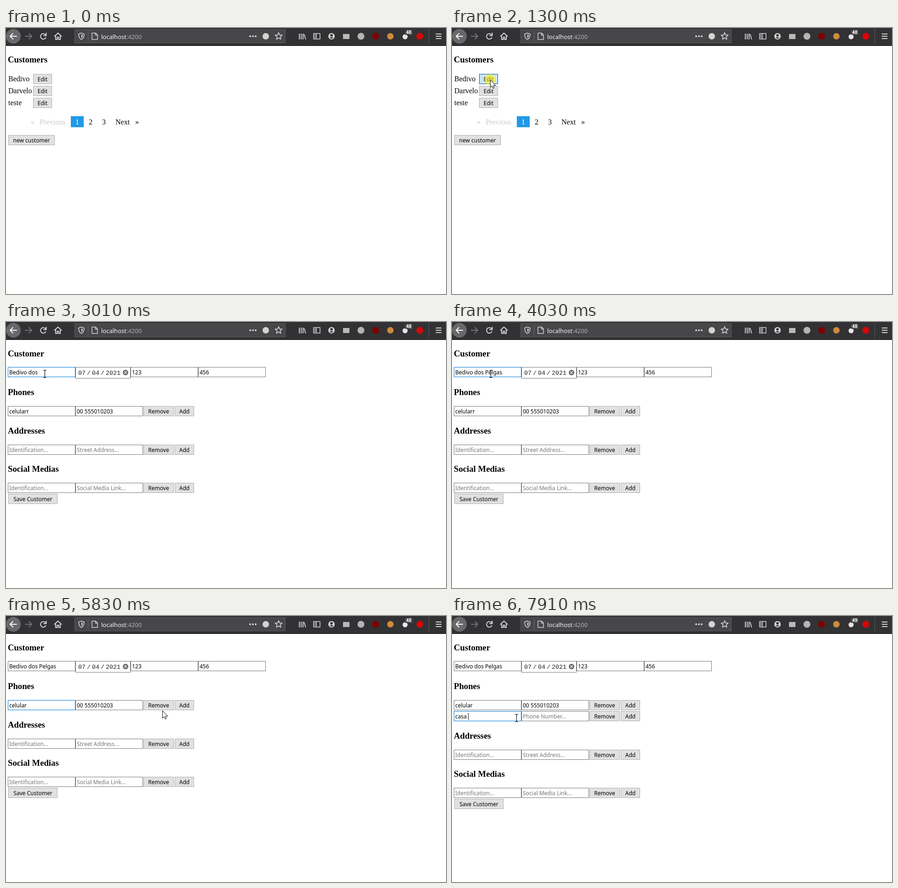
Animation of 957x579 px, one loop 8 s. Source, as an HTML page with a canvas:

```html
<!DOCTYPE html>
<html lang="en">
<head>
<meta charset="utf-8">
<title>Customer form</title>
<style>
html, body { margin: 0; width: 100%; height: 100%; overflow: hidden; background: #fff; }
canvas { display: block; width: 957px; height: 579px; }
</style>
</head>
<body>
<canvas id="stage" width="957" height="579"></canvas>
<script>
const ctx = document.getElementById('stage').getContext('2d');
const LOOP = 8000;
const UI = '12px "Noto Sans", "Open Sans", sans-serif';
const SERIF = '16px "Liberation Serif", serif';
const HEADING = 'bold 18.72px "Liberation Serif", serif';
const MONO = '13.3px "Liberation Mono", monospace';

// Pointer moves: start, end, number of steps, polyline
const moves = [
  [70, 840, 11, [[782, 518], [430, 300], [200, 180], [96, 136], [83, 125], [83, 125]]],
  [920, 980, 2, [[83, 119], [83, 113]]],
  [4580, 5200, 9, [[83, 113], [83, 118], [82, 160], [83, 187], [83, 187]]],
  [5520, 6290, 11, [[83, 187], [200, 198], [340, 206], [376, 212], [380, 200], [380, 200]]],
  [6360, 6820, 7, [[352, 200], [300, 214], [180, 224], [138, 223]]],
  [7830, 7910, 2, [[139, 223], [139, 222]]],
];
const clicks = [[1300, 1390], [1930, 2010], [5122, 5200], [6290, 6360], [6980, 7060]];
const caretOff = [[3010, 3160], [4030, 4580], [5674, 6290]];
const nameKeys = [2310, 2470, 2710, 2785, 2860, 3160, 3330, 3480, 3570, 3710, 3860];
const labelKeys = [7213, 7290, 7520, 7670, 7750];

const within = (t, spans) => spans.some(([a, b]) => t >= a && t < b);
const typed = (text, keys, t) => text.slice(0, keys.filter(k => k <= t).length);
const hits = (p, x, y, w, h) => p && p[0] >= x && p[0] < x + w && p[1] >= y && p[1] < y + h;

function pointerAt(t) {
  const move = moves.filter(m => m[0] <= t).pop();
  if (!move) return null;
  const [start, end, steps, points] = move;
  const step = Math.min(steps - 1, Math.floor((t - start) / (end - start) * (steps - 1) + 0.01));
  const u = step / (steps - 1) * (points.length - 1);
  const i = Math.min(points.length - 2, Math.floor(u));
  return points[i].map((v, k) => Math.round(v + (points[i + 1][k] - v) * (u - i)));
}

function text(str, x, y, font = UI, color = '#000', align = 'left') {
  ctx.font = font;
  ctx.fillStyle = color;
  ctx.textAlign = align;
  ctx.fillText(str, x, y);
}

function rect(x, y, w, h, fill, border) {
  ctx.fillStyle = border || fill;
  ctx.fillRect(x, y, w, h);
  if (border) {
    ctx.fillStyle = fill;
    ctx.fillRect(x + 1, y + 1, w - 2, h - 2);
  }
}

function disc(x, y, r, fill) {
  ctx.fillStyle = fill;
  ctx.beginPath();
  ctx.arc(x, y, r, 0, 2 * Math.PI);
  ctx.fill();
}

function icon(x, y, d, { stroke = '#d4d4d5', fill, width = 2 } = {}) {
  const path = new Path2D(d);
  ctx.save();
  ctx.translate(x, y);
  ctx.lineJoin = ctx.lineCap = 'round';
  ctx.lineWidth = width;
  if (fill) { ctx.fillStyle = fill; ctx.fill(path); }
  if (stroke) { ctx.strokeStyle = stroke; ctx.stroke(path); }
  ctx.restore();
}

function starPath() {
  const points = Array.from({ length: 10 }, (_, i) => {
    const r = i % 2 ? 3.6 : 8, a = i * Math.PI / 5;
    return (r * Math.sin(a)).toFixed(2) + ' ' + (-r * Math.cos(a)).toFixed(2);
  });
  return 'M' + points.join('L') + 'Z';
}
const STAR = starPath();

function toolbar(count) {
  rect(0, 0, 957, 39, '#323234');
  rect(0, 38, 957, 1, '#0c0c0d');
  disc(16, 18, 16, '#69696b');
  icon(16, 18, 'M7 0H-7M-1 -6L-7 0L-1 6', { stroke: '#f9f9fa' });
  icon(49, 18, 'M-7 0H7M1 -6L7 0L1 6', { stroke: '#737375' });
  icon(81, 18, 'M5.5 -2.5A6 6 0 1 0 5.5 3M6.5 -7V-1.5H1');
  icon(113, 18, 'M-7.5 0L0 -7L7.5 0M-5 0V7H-1.5V2H1.5V7H5V0');

  rect(149, 3, 459, 30, '#474749', '#5c5c5e');
  icon(164, 18, 'M0 -7L6 -5C6 1 4 5 0 7C-4 5 -6 1 -6 -5Z', { width: 1.6 });
  icon(164, 18, 'M0 -4L3 -3C3 0 2 3 0 4Z', { stroke: null, fill: '#d4d4d5' });
  rect(178, 7, 1, 22, '#69696b');
  icon(193, 18, 'M-6 -7H2L6 -3V7H-6ZM1.5 -7V-2.5H6', { width: 1.5 });
  const urlFont = UI.replace('12px', '13px');
  text('localhost', 207, 24, urlFont, '#f9f9fa');
  text(':4200', 207 + ctx.measureText('localhost').width, 24, urlFont, '#b1b1b3');
  for (const x of [531, 537, 543]) disc(x, 18, 2, '#d4d4d5');
  disc(565, 18, 7, '#d4d4d5');
  icon(593, 18, STAR, { width: 1.6 });

  icon(644, 18, 'M-6 -5V6M-2 -5V6M2 -5V6M4.5 -4L7.5 6', { width: 1.9 });
  icon(676, 18, 'M-7 -6H7V6H-7ZM-1 -6V6M-5 -3H-3M-5 0H-3M-5 3H-3', { width: 1.5 });
  disc(708, 18, 7, '#d4d4d5');
  disc(708, 16, 2.8, '#323234');
  icon(708, 18, 'M-4 3Q0 1 4 3Q0 7 -4 3Z', { stroke: null, fill: '#323234' });
  rect(733, 13, 14, 11, '#b9b9b9');
  disc(772, 18, 7.5, '#b4b4b4');
  disc(804, 18, 7.5, '#800000');
  disc(836, 18, 7, '#cf8a3c');
  disc(868, 19, 5.5, '#e6e6e6');
  rect(868, 4, 16, 11, '#4a4a4c');
  text(count, 876, 13, 'bold 10px "Noto Sans", sans-serif', '#fff', 'center');
  disc(900, 18, 7.5, '#d40808');
  rect(919, 1, 1, 34, '#58585a');
  icon(941, 18, 'M-5.5 -5H5.5M-5.5 0H5.5M-5.5 5H5.5', { width: 1.8 });
}

// s is the state at one time; buttons react to the pointer slightly late
function button(s, label, x, y, w, focused) {
  const hot = hits(s.lagged, x, y, w, 22);
  const down = hot && s.clicking;
  rect(x, y, w, 22, down ? '#cce4f7' : hot ? '#e5f1fb' : '#e1e1e1',
    down ? '#005499' : hot || focused ? '#0078d7' : '#adadad');
  text(label, x + w / 2, y + 16, UI, '#000', 'center');
}

function field(s, x, y, value, placeholder, focused) {
  rect(x, y, 147, 22, '#fff', focused ? '#0078d7' : '#767676');
  text(value || (placeholder || ''), x + 3, y + 16, UI, value ? '#000' : '#757575');
  if (focused && s.caret) {
    const width = value ? ctx.measureText(value).width : 0;
    rect(Math.round(x + 3 + width), y + 4, 1, 15, '#000');
  }
  if (hits(s.pointer, x, y, 147, 22)) s.overText = true;
}

function customerList(s) {
  text('Customers', 4, 75, HEADING);
  ['Bedivo', 'Darvelo', 'teste'].forEach((name, i) => {
    text(name, 5, 116 + 26 * i, SERIF);
    button(s, 'Edit', 59, 100 + 26 * i, 41);
  });
  text('«', 54, 210, SERIF, '#cacaca');
  text('Previous', 73.5, 210, SERIF, '#cacaca');
  rect(141, 192, 28, 24, '#2199e8');
  text('1', 151, 210, SERIF, '#fff');
  text('2', 180, 210, SERIF);
  text('3', 209, 210, SERIF);
  text('Next', 238, 210, SERIF);
  text('»', 281, 210, SERIF);
  button(s, 'new customer', 5, 233, 101);
}

function contactRow(s, y, label, value, hint, focused, addFocused) {
  field(s, 4, y, label, 'Identification...', focused);
  field(s, 151, y, value, hint);
  button(s, 'Remove', 299, y, 66);
  button(s, 'Add', 367, y, 42, addFocused);
}

function customerForm(s, t) {
  const added = t >= 6360;
  const shift = added ? 24 : 0;
  text('Customer', 4, 75, HEADING);
  field(s, 4, 98, 'Bedivo' + typed(' dos Pelgas', nameKeys, t), '', t >= 1930 && t < 5122);
  rect(151, 98, 120, 25, '#fff', '#767676');
  for (const [part, x] of [['07', 157], ['/', 176], ['04', 187], ['/', 206], ['2021', 217]])
    text(part, x, 115, MONO, '#222');
  disc(260, 110, 6, '#6b6b6b');
  icon(260, 110, 'M-2 -2L2 2M2 -2L-2 2', { stroke: '#fff', width: 1.6 });
  field(s, 271, 98, '123');
  field(s, 418, 98, '456');

  text('Phones', 4, 159, HEADING);
  contactRow(s, 183, t < 5520 ? 'celularr' : 'celular', '00 555010203', '',
    t >= 5122 && t < 6290, t >= 6290 && t < 6980);
  if (added) contactRow(s, 207, typed('casa ', labelKeys, t), '', 'Phone Number...', t >= 6980);

  text('Addresses', 4, 243 + shift, HEADING);
  contactRow(s, 267 + shift, '', '', 'Street Address...');
  text('Social Medias', 4, 326 + shift, HEADING);
  contactRow(s, 350 + shift, '', '', 'Social Media Link...');
  button(s, 'Save Customer', 5, 374 + shift, 107);
}

function drawPointer(s) {
  if (!s.pointer) return;
  const [x, y] = s.pointer;
  if (s.clicking) disc(x - 0.5, y - 0.5, 12, 'rgba(250,238,20,.6)');
  if (s.overText)
    icon(x + 1.5, y, 'M-3 -8H-1L0 -7L1 -8H3M0 -7V7M-3 8H-1L0 7L1 8H3', { stroke: '#000', width: 1.1 });
  else
    icon(x + 0.5, y + 0.5, 'M0 0V16L3.6 12.6L6 18L8.4 17L6.1 11.6H11Z',
      { stroke: '#000', fill: '#fff', width: 1 });
}

function draw(t) {
  const state = {
    pointer: pointerAt(t),
    lagged: pointerAt(t - 75),
    clicking: within(t, clicks),
    caret: !within(t, caretOff),
    overText: false,
  };
  rect(0, 0, 957, 579, '#fff');
  toolbar(t < 7135 ? '48' : '49');
  if (t < 1390) customerList(state);
  else customerForm(state, t);
  drawPointer(state);
}

const began = performance.now();
function tick() {
  draw((performance.now() - began) % LOOP);
  requestAnimationFrame(tick);
}
tick();
</script>
</body>
</html>
```
